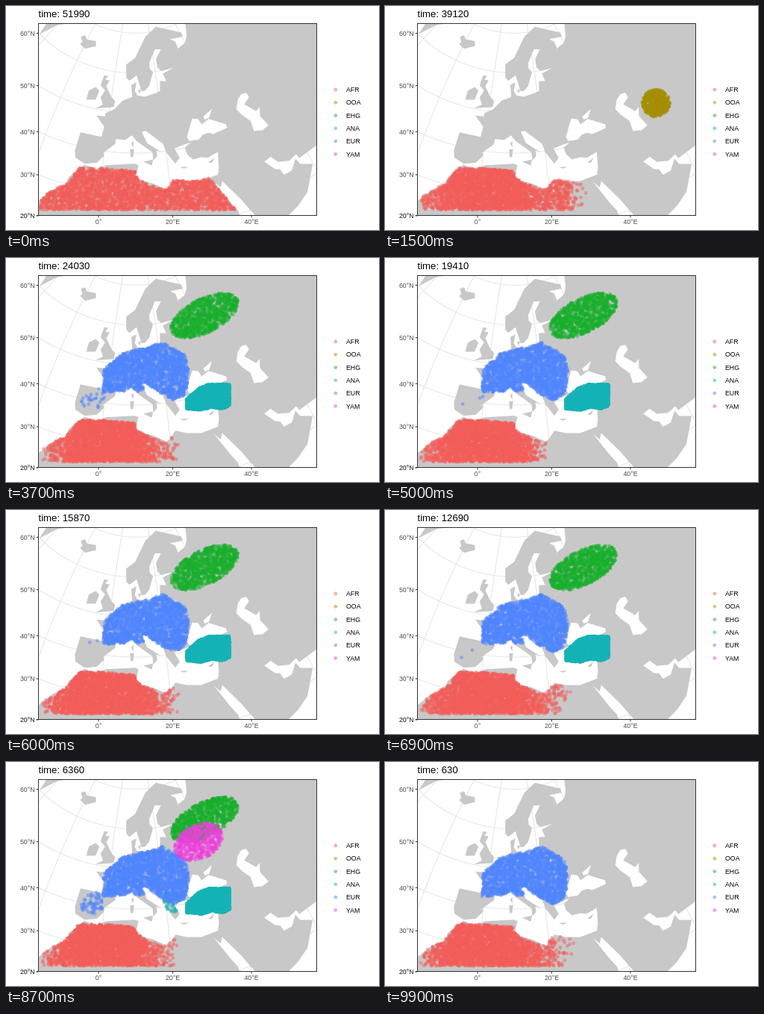
Write an HTML page with a canvas that moves like this. It is 500 by 300 pixels and loops after 10 s.

```html
<!DOCTYPE html>
<html lang="en">
<head>
<meta charset="utf-8">
<title>Population ranges through time</title>
<style>
  html, body { margin: 0; width: 100%; height: 100%; overflow: hidden; background: #fff; }
  canvas { display: block; width: 500px; height: 300px; }
</style>
</head>
<body>
<canvas id="stage" width="500" height="300"></canvas>
<script>
const FONT = '"Liberation Sans", Arial, sans-serif';
const PANEL = { x: 43.5, y: 23.5, w: 373, h: 257 };
const LOOP = 10000, FRAME = 100;
const COLORS = { AFR: '#f45e5a', OOA: '#a68e00', EHG: '#18b02c', ANA: '#16b3b8', EUR: '#5086ff', YAM: '#f23edf' };

// Simplified coasts as lon, lat pairs
const scandinavia = [35,64.3, 35,66, 32.5,67, 40.5,66.4, 41,67.5, 31,70, 25.7,71, 17,69, 12.5,66, 10,63.8,
  5.2,62, 5.7,58.7, 7.2,58, 10.6,59.4, 12.8,55.4, 14.3,55.5, 16.3,56.6, 18.8,59.9, 17.3,61, 17.5,62.3,
  21.8,65.5, 25.3,65.2, 21.4,63, 21.4,61, 22.8,59.9, 29.5,60, 32,61];
const europe = [48,70, 44.5,67.5, 43,66.2, 40,64.8, 35,64.2, 31,61, 29.5,60, 23.5,59.2, 24.3,57.2, 21.5,57.5,
  20.8,55, 18.5,54.6, 14,54, 10.9,54.4, 9.8,55.5, 10.5,57.6, 8.2,57, 8.7,54, 4.8,53, 1.6,50.6, -1.5,49.4,
  -1.5,48.6, -4.7,48.4, -1.2,46, -1.6,43.4, -9,43.4, -9.4,38.7, -8.8,37, -5.6,36, -2,36.8, 0,38.7,
  -0.3,39.6, 3.2,42, 3.4,43.3, 6.5,43.2, 8.8,44.4, 10.5,43, 15.6,40, 15.7,38, 17,39, 16.9,40.4, 18.4,39.9,
  14,42.4, 12.3,45.3, 13.7,45.5, 19.3,41.9, 20,39.7, 22.4,36.5, 24,37.8, 22.8,40.3, 26,40.8, 29,41,
  45,41, 110,35, 110,60];
const asia = [26.2,40, 26.5,38.3, 28,36.7, 30.6,36.7, 32.5,36.1, 36,36.7, 35,33, 34.2,31.3, 32.3,31.2,
  32.6,29.8, 34,28, 34.9,29.4, 38.5,23.5, 43.2,13, 45,13, 52,15.6, 55.5,17.4, 59.8,22.5, 56.8,24.4,
  56.3,26.2, 54,24.2, 51.6,24.3, 51.2,26, 50,26.7, 48,29.7, 50.2,30, 51.5,27.9, 54.5,26.6, 57,27,
  57.3,25.7, 66.5,25.3, 70,22, 85,25, 110,35, 45,45, 29,41.2];
const africa = [32.5,31.2, 29,30.9, 25,31.7, 21.8,32.8, 20,31, 19,30.3, 15.2,32.2, 11.2,33.2, 10.2,34.2,
  11,37, 9.8,37.3, 1,36.5, -2,35.1, -5.6,35.8, -9.5,31.8, -9.8,29.8, -13,27.7, -16.3,23.5, -17,18, 0,10,
  38,10, 40,15, 37.2,18.8, 37,21, 35.5,23.8, 32.6,29.8];
const britain = [-5.7,50.1, 1.4,51.2, 1.7,52.7, 0,53.5, -3,56, -2,57.6, -4,57.6, -3.1,58.6, -5,58.6, -5.6,56,
  -3.2,54.9, -4.5,53, -3,51.4];
const iceland = [-22.5,63.9, -18.8,63.4, -13.6,65, -14.8,66.2, -20.3,65.7, -22.5,66.4, -24.3,65.6, -22,64.7];
const greenland = [-43.5,59.9, -40,64.5, -32,68, -22,70, -60,75];
const ireland = [-6.3,52.2, -5.6,54.6, -7.5,55.3, -10,54, -10,51.6];
const sicily = [12.5,37.8, 15.6,38.2, 15.1,36.7];
const sardinia = [8.3,40.9, 9.6,41, 9.3,39, 8.5,39];
const corsica = [8.6,42.4, 9.4,43, 9.3,41.4];
const crete = [23.6,35.5, 26.2,35.2, 24.8,34.9];
const cyprus = [32.3,34.9, 34.5,35.6, 33.4,34.6];
const zealand = [11.1,55.6, 12.5,56, 12.1,54.9];
const land = [scandinavia, europe, asia, africa, britain, iceland, greenland, ireland, sicily, sardinia,
  corsica, crete, cyprus, zealand];

const blackSea = [28,41.4, 27.6,42.5, 29.7,45.2, 31,46.6, 33,46, 33.6,44.5, 36.6,45.2, 39.8,43.4, 41.6,42.3,
  41.4,41.4, 36.4,41.3, 35,42, 33,42, 31.2,41.1];
const azov = [35.2,45.4, 36.8,45.4, 39,47.2, 35,46.2];
const caspian = [47,44.5, 49,46.3, 51.2,47, 53,46.6, 53,45.3, 50.3,44.5, 52.7,41.5, 54.5,41.9, 53,40,
  53.9,36.9, 51.5,36.7, 49,37.6, 49.5,40.2, 47.7,42.8];

// Ranges in stage pixels: polygons, then tilted ellipses
const AFR = [45,273, 45,258, 84,235, 98,217, 125,217, 172,221, 182,235, 212,247, 222,234, 272,230, 308,273];
const ANA = [242,189, 259,174, 272,169, 300,169, 300,198, 290,202, 275,200, 262,204, 242,202];
const EUR = [130,180, 131,150, 152,129, 210,113, 240,130, 245,150, 243,172, 236,191, 224,190, 200,178];
const EHG = { x: 266, y: 77, rx: 49, ry: 23, tilt: -.47 };
const YAM = { x: 258, y: 107, rx: 34, ry: 23, tilt: -.44 };
const IBERIA = { x: 117, y: 189, rx: 17, ry: 14, tilt: -.5 };
const BALKANS = { x: 220, y: 188, rx: 16, ry: 14, tilt: 0 };

// Each step: year and change in the number of people
const EVENTS = [[51000, 500], [28000, 4000], [25000, 1500], [7000, 565], [6000, -1000], [4000, -3000], [2500, -565]];
const REACH = [[0, 400], [8, 300], [15, 275], [37, 236], [50, 220], [69, 255], [87, 236], [99, 258]];
const IBERIANS = [[35, 0], [37, 26], [50, 3], [69, 2], [80, 12], [87, 70], [94, 15], [99, 0]];
const OOA_PATH = [[0, 33, 30], [.2, 40, 30], [.48, 50, 30], [1, 60, 40]];

const RAD = Math.PI / 180, KM = 20.7, LAT0 = 52 * RAD;
// Lambert azimuthal equal-area, centred on 10E 52N
function project(lon, lat) {
  const d = (lon - 10) * RAD, p = lat * RAD;
  const s0 = Math.sin(LAT0), c0 = Math.cos(LAT0), s = Math.sin(p), c = Math.cos(p);
  const k = 6371 / KM * Math.sqrt(2 / (1 + s0 * s + c0 * c * Math.cos(d)));
  return [173.3 + k * c * Math.sin(d), 132.6 - k * (c0 * s - s0 * c * Math.cos(d))];
}

const clamp = v => Math.min(1, Math.max(0, v));

function at(keys, v) {
  const last = keys[keys.length - 1];
  if (v <= keys[0][0]) return keys[0].slice(1);
  if (v >= last[0]) return last.slice(1);
  const i = keys.findIndex(key => key[0] > v), a = keys[i - 1], b = keys[i];
  const f = (v - a[0]) / (b[0] - a[0]);
  return a.slice(1).map((n, j) => n + (b[j + 1] - n) * f);
}

// Every frame spends the same number of person-years
function yearAt(k) {
  let left = Math.max(0, 3.188e6 * (k - 1) - 5e4), year = 51990, people = 3000;
  for (const [when, change] of EVENTS) {
    const cost = (year - when) * people;
    if (cost > left) break;
    left -= cost;
    year = when;
    people += change;
  }
  return Math.round((year - left / people) / 30) * 30;
}

function randomizer(seed) {
  return () => {
    seed = seed + 0x6D2B79F5 | 0;
    let n = Math.imul(seed ^ seed >>> 15, 1 | seed);
    n = n + Math.imul(n ^ n >>> 7, 61 | n) ^ n;
    return ((n ^ n >>> 14) >>> 0) / 4294967296;
  };
}

function inside(poly, x, y) {
  let hit = false;
  for (let i = 0, j = poly.length - 2; i < poly.length; j = i, i += 2) {
    const y1 = poly[i + 1], y2 = poly[j + 1];
    if (y1 > y !== y2 > y && x < (poly[j] - poly[i]) * (y - y1) / (y2 - y1) + poly[i]) hit = !hit;
  }
  return hit;
}

const ctx = document.getElementById('stage').getContext('2d');
const base = document.createElement('canvas');
base.width = 500;
base.height = 300;
const map = base.getContext('2d', { willReadFrequently: true });

function trace(list, close = true) {
  map.beginPath();
  for (let i = 0; i < list.length; i += 2) map.lineTo(...project(list[i], list[i + 1]));
  if (close) map.closePath();
}

function text(c, str, x, y, size, color, align = 'left') {
  c.font = `${size}px ${FONT}`;
  c.fillStyle = color;
  c.textAlign = align;
  c.fillText(str, x, y);
}

function dot(c, x, y) {
  c.beginPath();
  c.arc(x, y, 2.4, 0, 7);
  c.fill();
}

function drawBase() {
  map.fillStyle = '#fff';
  map.fillRect(0, 0, 500, 300);
  map.save();
  map.beginPath();
  map.rect(PANEL.x, PANEL.y, PANEL.w, PANEL.h);
  map.clip();
  map.strokeStyle = '#e6e6e6';
  map.lineWidth = 1.1;
  const steps = (from, to, by) => Array.from({ length: (to - from) / by + 1 }, (_, i) => from + i * by);
  for (let lon = -60; lon <= 80; lon += 20) {
    trace(steps(10, 85, 2.5).flatMap(lat => [lon, lat]), false);
    map.stroke();
  }
  for (let lat = 20; lat <= 70; lat += 10) {
    trace(steps(-60, 90, 2).flatMap(lon => [lon, lat]), false);
    map.stroke();
  }
  const fill = (list, color) => { trace(list); map.fillStyle = color; map.fill(); };
  land.forEach(list => fill(list, '#c8c8c8'));
  [blackSea, azov, caspian].forEach(list => fill(list, '#fff'));
  map.restore();

  map.strokeStyle = '#333';
  map.lineWidth = 1;
  map.strokeRect(PANEL.x, PANEL.y, PANEL.w, PANEL.h);
  map.beginPath();
  [[60, 36.5], [50, 106.7], [40, 168.3], [30, 226], [20, 280.5], [20, 281]].forEach(([n, y]) => {
    text(map, n + '°N', 38.6, y + 3.2, 8.8, '#4d4d4d', 'right');
    map.moveTo(40.7, y);
    map.lineTo(43.5, y);
  });
  [['0°', 124], ['20°E', 223.5], ['40°E', 329]].forEach(([label, x]) => {
    text(map, label, x, 292.2, 8.8, '#4d4d4d', 'center');
    map.moveTo(x, 280.5);
    map.lineTo(x, 283.4);
  });
  map.stroke();
  Object.keys(COLORS).forEach((pop, i) => {
    const y = 112 + i * 17.28;
    text(map, pop, 456, y + 3.2, 8.8, '#000');
    map.globalAlpha = .5;
    map.fillStyle = COLORS[pop];
    dot(map, 441.8, y);
    map.globalAlpha = 1;
  });
}

drawBase();
const pixels = map.getImageData(0, 0, 500, 300).data;
const onLand = (x, y) => pixels[4 * (Math.round(y) * 500 + Math.round(x))] < 215;
const anywhere = () => true;

function fillRange(rnd, poly, n, keep = anywhere) {
  const xs = poly.filter((_, i) => i % 2 === 0), ys = poly.filter((_, i) => i % 2);
  const x0 = Math.min(...xs), y0 = Math.min(...ys);
  const w = Math.max(...xs) - x0, h = Math.max(...ys) - y0;
  for (let made = 0, tries = 0; made < n && tries < n * 20; tries++) {
    const x = x0 + rnd() * w, y = y0 + rnd() * h;
    if (!inside(poly, x, y) || !keep(x, y)) continue;
    dot(ctx, x, y);
    made++;
  }
}

function fillCloud(rnd, { x, y, rx, ry, tilt }, n, keep = anywhere) {
  for (let i = 0; i < n; i++) {
    const a = rnd() * 2 * Math.PI, r = Math.sqrt(rnd());
    const u = rx * r * Math.cos(a), v = ry * r * Math.sin(a);
    const px = x + u * Math.cos(tilt) - v * Math.sin(tilt);
    const py = y + u * Math.sin(tilt) + v * Math.cos(tilt);
    if (keep(px, py)) dot(ctx, px, py);
  }
}

function drawFrame(k) {
  const year = yearAt(k);
  const rnd = randomizer(k * 7919 + 17);
  const alive = (from, to) => year <= from && year > to;
  const use = pop => { ctx.fillStyle = COLORS[pop]; };
  ctx.globalAlpha = 1;
  ctx.drawImage(base, 0, 0);
  text(ctx, 'time: ' + year, 43.5, 14.6, 13.2, '#000');
  ctx.globalAlpha = .5;

  use('AFR');
  const reach = at(REACH, k)[0], even = clamp(1 - k / 8);
  const bump = clamp(1 - Math.abs(k - 13) / 14);
  fillRange(rnd, AFR, 3000, (x, y) => {
    const east = x < 175 ? 1 : Math.max(0, (reach - x) / (reach - 175)) ** 1.7;
    const west = clamp((x - 46) / 50);
    const pocket = .35 * bump * Math.exp(-(((x - 238) / 15) ** 2));
    return onLand(x, y) && rnd() < Math.max(even, east * west + pocket);
  });

  if (alive(51000, 25000)) {
    use('OOA');
    const [x, y] = project(...at(OOA_PATH, (50000 - year) / 10000));
    fillCloud(rnd, { x, y, rx: 18.5, ry: 18.5, tilt: 0 }, 500, onLand);
  }
  if (alive(28000, 6030)) {
    use('EHG');
    fillCloud(rnd, EHG, 1000);
  }
  if (alive(28000, 4000)) {
    use('ANA');
    fillRange(rnd, ANA, 2900);
    fillCloud(rnd, BALKANS, Math.round(90 * clamp((10000 - year) / 3000)), onLand);
  }
  if (year <= 25000) {
    use('EUR');
    fillRange(rnd, EUR, 2000, onLand);
    fillCloud(rnd, IBERIA, Math.round(at(IBERIANS, k)[0]), onLand);
  }
  if (alive(7000, 2500)) {
    use('YAM');
    const move = clamp((5000 - year) / 2000);
    fillCloud(rnd, { ...YAM, x: YAM.x - 68 * move, y: YAM.y + 35 * move }, 500);
  }
}

let shown = -1;
const start = performance.now();
function tick() {
  const k = Math.floor((performance.now() - start) % LOOP / FRAME);
  if (k !== shown) drawFrame(shown = k);
  requestAnimationFrame(tick);
}
tick();
</script>
</body>
</html>
```
